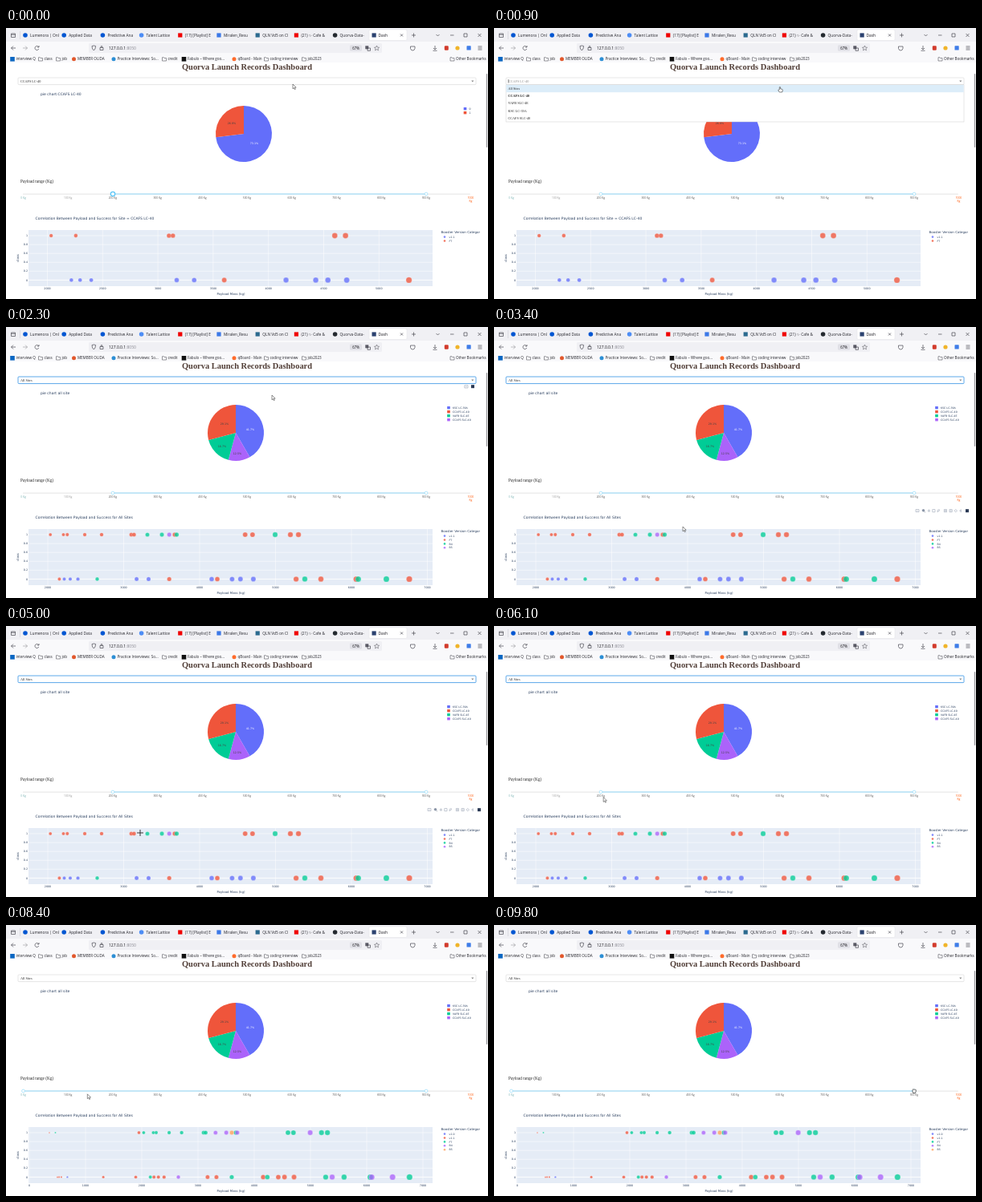
An HTML page for the animation above (9900 ms loop, 600 by 338 pixels).

```html
<!DOCTYPE html>
<html lang="en">
<head>
<meta charset="utf-8">
<title>Dashboard</title>
<style>
html, body { margin: 0; width: 100%; height: 100%; overflow: hidden; background: #fff; }
svg { display: block; width: 100vw; height: 100vh; }
text { white-space: pre; }
.ui { font-family: "Open Sans", "Noto Sans", sans-serif; }
.serif { font-family: "Liberation Serif", serif; }
.plot { font-family: "DejaVu Sans", sans-serif; }
.line { fill: none; stroke: #4a4a52; stroke-width: .7; }
</style>
</head>
<body>
<svg id="stage" viewBox="0 0 600 338" xmlns="http://www.w3.org/2000/svg">
  <defs><clipPath id="legendClip"><rect x="535" y="245" width="55" height="45"/></clipPath></defs>
  <g id="browser"></g>
  <g id="page"></g>
  <g id="pieSite"></g>
  <g id="pieAll"></g>
  <g id="slider"></g>
  <g id="scatterSite"></g>
  <g id="scatterAll"></g>
  <g id="scatterFull"></g>
  <g id="pieBar"></g>
  <g id="scatterBar"></g>
  <g id="dropdown"></g>
  <g id="menu"></g>
  <g id="cursor">
    <path id="arrow" d="M0 0V5.8L1.4 4.6 2.4 6.7 3.3 6.3 2.4 4.2H4.2Z" fill="#fff" stroke="#222" stroke-width=".5"/>
    <path id="hand" d="M-.7 3.4V.3Q0-.5.6.3V2.4L2.8 2.9Q3.5 3.2 3.3 4.2L2.7 6.5H-.7L-2.2 4.2Q-2.2 3.3-1.4 3.6Z" fill="#fff" stroke="#222" stroke-width=".55"/>
    <path id="cross" d="M-4 0H4M0-4V4" stroke="#222" stroke-width=".9"/>
    <path id="grab" d="M-2 1.2V-.5Q-1.5-1.4-.7-.8 0-1.6.7-.8 1.6-1.4 2.2-.2V1.6L1.4 3.6H-1.3Z" fill="#fff" stroke="#222" stroke-width=".7"/>
  </g>
</svg>
<script>
const $ = id => document.getElementById(id);
const INK = '#2a3f5f';
const COLORS = ['#636efa', '#ef553b', '#00cc96', '#ab63fa', '#ffa15a'];

function add(parent, tag, attrs, content) {
  const el = document.createElementNS('http://www.w3.org/2000/svg', tag);
  for (const key in attrs) el.setAttribute(key, attrs[key]);
  if (content !== undefined) el.textContent = content;
  parent.appendChild(el);
  return el;
}
const rect = (g, x, y, width, height, fill, more) => add(g, 'rect', { x, y, width, height, fill, ...more });
const dot = (g, cx, cy, r, fill, more) => add(g, 'circle', { cx, cy, r, fill, ...more });
const line = (g, d, more) => add(g, 'path', { d, class: 'line', ...more });
// y is the vertical middle of the lettering
const label = (g, cls, x, y, size, str, fill, more) =>
  add(g, 'text', { x, y: y + size * .35, class: cls, 'font-size': size, fill, ...more }, str);
const middle = { 'text-anchor': 'middle' };

function drawBrowser(g) {
  rect(g, 0, 0, 600, 17, '#f0f0f4');
  rect(g, 0, 17, 600, 26, '#f9f9fb');
  rect(g, 452, 2, 47, 13.5, '#fff', { rx: 1.5, stroke: '#d8d8de', 'stroke-width': .4 });
  line(g, 'M6.5 7H11.5V11.5H6.5ZM6.5 8.3H11.5');
  line(g, 'M17.5 4V14', { style: 'stroke:#c8c8d0;stroke-width:.5' });
  const tabs = [
    ['Lumenora | Onl', '#0056d2', 1], ['Applied Data', '#0056d2', 1], ['Predictive Ana', '#0056d2', 1],
    ['Talent Lattice', '#4d8df5', 1], ['(17) [Playlist] E', '#f00000', 0], ['Miralen_Resu', '#3b78e7', 0],
    ['QLN Vd5 on Cl', '#2c6a8f', 0], ['(21) ✨ Cafe &', '#f00000', 0], ['Quorva-Data-', '#24292f', 1]
  ];
  tabs.forEach(([name, color, round], i) => {
    const x = 24 + i * 48.2;
    round ? dot(g, x, 9, 2.8, color) : rect(g, x - 2.6, 6.4, 5.2, 5.2, color);
    label(g, 'ui', x + 6, 9, 4.8, name, '#25252c');
  });
  rect(g, 455.5, 6.4, 5.2, 5.2, '#2b426f');
  add(label(g, 'ui', 463.5, 9, 4.8, '', '#15141a'), 'tspan', { id: 'tabName' }, 'Dash');
  line(g, 'M491 7.5L494 10.5M494 7.5L491 10.5M505 9H510M507.5 6.5V11.5M535.5 8L537.5 10 539.5 8M553 9H557.5M570 7H574V11H570ZM587.5 7L591.5 11M591.5 7L587.5 11');

  rect(g, 103, 19, 365, 12, '#f0f0f4', { rx: 1.5 });
  line(g, 'M12 25H6.5M9 22.5L6.5 25 9 27.5');
  line(g, 'M21 25H26.5M24 22.5L26.5 25 24 27.5', { opacity: .5 });
  line(g, 'M40.6 23.7A2.5 2.5 0 1 0 40.8 26M41 22V24H39');
  line(g, 'M107 22.6L109.3 22 111.6 22.6Q111.6 26.5 109.3 28 107 26.5 107 22.6ZM117 24.5H121V27.5H117ZM118 24.5Q118 22.3 119 22.3 120 22.3 120 24.5');
  const url = label(g, 'ui', 128, 25, 5, '127.0.0.1', '#15141a');
  add(url, 'tspan', { fill: '#8a8a93' }, ':8050');
  rect(g, 428, 21.3, 15, 7.4, '#e0e0e6', { rx: 1.5 });
  label(g, 'ui', 435.5, 25, 4.4, '67%', '#15141a', middle);
  rect(g, 447.3, 22.3, 4, 4, '#5b5b66');
  line(g, 'M450 25H453.5V28.3H450Z');
  line(g, 'M461.5 22L462.4 24.1 464.6 24.3 462.9 25.7 463.5 27.9 461.5 26.7 459.5 27.9 460.1 25.7 458.4 24.3 460.6 24.1Z', { style: 'stroke-width:.5' });
  line(g, 'M503.5 23H509V25.5Q508.5 28 506.3 28 504 28 503.5 25.5ZM534 22V26.5M532 25L534 27 536 25M531.5 28.3H536.5');
  rect(g, 545.8, 22.3, 5, 5.4, '#d23b2c', { rx: 1.2 });
  dot(g, 562, 25, 2.6, '#f0b429');
  rect(g, 573.5, 22.3, 5.2, 5.2, '#3f7de8', { rx: .6 });
  line(g, 'M587.5 23H592.5M587.5 25H592.5M587.5 27H592.5');

  const marks = [
    [8, 'interview Q', '#0a66c2'], [43, 'class'], [65, 'job'], [84.5, 'MEMBER OLIDA', '#e2582c'],
    [134, 'Practice Interviews: So...', '#2d8fd5'], [197, 'credit'], [221.5, 'Fabulo – Where goo…', '#111'],
    [284, 'qBoard - Main', '#ff6c2c'], [324, 'coding interview'], [371, 'job2023'], [555.5, 'Other Bookmarks']
  ];
  for (const [x, name, color] of marks) {
    if (!color) line(g, `M${x - 2.5} 36.7H${x - .5}L${x} 37.5H${x + 2.5}V41H${x - 2.5}Z`, { style: 'stroke-width:.55' });
    else if (x < 20 || x > 220 && x < 230) rect(g, x - 2.8, 36, 5.6, 5.6, color);
    else dot(g, x, 38.8, 2.5, color);
    label(g, 'ui', x + 4.4, 38.8, 4.6, name, '#25252c');
  }
}

function drawPage(g) {
  rect(g, 0, 43, 600, 295, '#fff');
  label(g, 'serif', 300, 48.8, 10.45, 'Quorva Launch Records Dashboard', '#503d36', { 'font-weight': 'bold', ...middle });
  rect(g, 597.8, 57, 1.4, 92, '#9a9a9e', { rx: .7 });
  label(g, 'serif', 18, 191.5, 5.25, 'Payload range (Kg)', '#222');
}

function drawDropdown() {
  const g = $('dropdown');
  rect(g, 15, 62, 570, 8.6, '#fff', { id: 'box', rx: 1 });
  label(g, 'serif', 18, 66.3, 4.2, 'CCAFS LC-40', '#222', { id: 'choice' });
  add(g, 'path', { d: 'M579.2 65.6H582.4L580.8 67.4Z', fill: '#888' });
  const m = $('menu');
  rect(m, 15, 70.8, 570, 46.2, '#fff', { stroke: '#ccc', 'stroke-width': .5 });
  rect(m, 15.3, 71, 569.4, 9.2, '#dcedf9');
  line(m, 'M18 64V68.6', { style: 'stroke:#111;stroke-width:.5' });
  ['All Sites', 'CCAFS LC-40', 'VAFB SLC-4E', 'KSC LC-39A', 'CCAFS SLC-40'].forEach((name, i) =>
    label(m, 'serif', 17.5, 75.6 + i * 9.15, 4.2, name, '#222', { 'font-weight': i === 1 ? 'bold' : 'normal' }));
}

// slices run clockwise from the top: [share, color index, label x, label y]
function drawPie(g, title, cx, slices, legendX, names) {
  label(g, 'plot', 43, 82.5, 4.5, title, INK);
  const r = 35, cy = 132;
  const at = share => `${cx + r * Math.sin(share * 2 * Math.PI)} ${cy - r * Math.cos(share * 2 * Math.PI)}`;
  let from = 0;
  for (const [share, color] of slices) {
    add(g, 'path', { d: `M${cx} ${cy}L${at(from)}A${r} ${r} 0 ${share > .5 ? 1 : 0} 1 ${at(from + share)}Z`, fill: COLORS[color] });
    from += share;
  }
  for (const [share, color, x, y] of slices)
    label(g, 'plot', x, y, 3.3, (share * 100).toFixed(1) + '%', color ? '#444' : '#fff', middle);
  names.forEach((name, i) => {
    rect(g, legendX - 1.8, 99 + i * 5, 3.6, 3.4, COLORS[i]);
    label(g, 'plot', legendX + 5, 100.8 + i * 5, 3.2, name, INK);
  });
}

// payloads per booster: [name, landed, failed]
const BOOSTERS = [
  ['v1.0', [], [677]],
  ['v1.1', [357, 1950], [500, 530, 570, 1316, 1893, 2217, 2296, 2397, 3170, 3328, 4159, 4428, 4538, 4708]],
  ['FT', [464, 2034, 2206, 2257, 2487, 2709, 3100, 3136, 3672, 4600, 4697, 5196, 5302],
    [2153, 3600, 4233, 5271, 5598, 6063, 6762]],
  ['B4', [3312, 3503, 3698, 4995], [2651, 5386, 6090, 6460]],
  ['B5', [3600], []]
];
const SITE_FT = [2034, 2257, 3100, 3136, 4600, 4697, 3600, 5271];

function drawScatter(g, { title, boosters, keep, max, x0, first, step, scale, count }) {
  const px = kg => x0 + (kg - first) * scale;
  label(g, 'plot', 36.5, 237.5, 4.5, title, INK);
  rect(g, 28, 252, 503, 70, '#e5ecf6');
  for (let i = 0; i < count; i++) {
    const kg = first + i * step, x = px(kg);
    line(g, `M${x} 252V322`, { style: 'stroke:#fff;stroke-width:.5' });
    label(g, 'plot', x, 324.6, 3.3, kg, INK, middle);
  }
  for (let i = 0; i <= 5; i++) {
    const y = 314.4 - i * 11.08;
    line(g, `M28 ${y}H531`, { style: `stroke:#fff;stroke-width:${i ? .5 : .9}` });
    label(g, 'plot', 27, y, 3.3, i / 5, INK, { 'text-anchor': 'end' });
  }
  label(g, 'plot', 280, 331.5, 3.9, 'Payload Mass (kg)', INK, middle);
  label(g, 'plot', 0, 0, 3.9, 'class', INK, { transform: 'translate(14.5 287)rotate(-90)', ...middle });
  label(g, 'plot', 541.5, 255, 4, 'Booster Version Category', INK, { 'clip-path': 'url(#legendClip)' });
  boosters.forEach(([name, ...rows], i) => {
    rows.forEach((row, failed) => row.filter(kg => keep(kg, name)).forEach(kg =>
      dot(g, px(kg), failed ? 314.4 : 259, 3.7 * Math.sqrt(kg / max), COLORS[i],
        { 'fill-opacity': .78, stroke: '#fff', 'stroke-width': .25 })));
    dot(g, 546, 260.6 + i * 4.9, 1.3, COLORS[i], { 'fill-opacity': .8 });
    label(g, 'plot', 551.5, 260.6 + i * 4.9, 3.2, name, INK);
  });
}

function drawSlider(g) {
  rect(g, 21, 206.4, 557, 1.3, '#e9e9e9', { rx: .6 });
  rect(g, 133, 206.4, 390, 1.3, '#abe2fb', { id: 'track' });
  for (let i = 0; i < 10; i++) {
    const x = 21.5 + i * 55.7;
    label(g, 'ui', x, 211.5, 3.3, i * 100 + ' Kg', i ? '#555' : '#77b0b1', { id: 'mark' + i, ...middle });
  }
  ['1000', 'Kg'].forEach((s, i) => label(g, 'ui', 578.5, 211.5 + i * 4, 3.3, s, '#f50', middle));
  const edge = { stroke: '#96dbfa', 'stroke-width': .7 };
  dot(g, 523, 207, 1.9, '#fff', edge);
  dot(g, 133, 207, 1.9, '#fff', { id: 'handle', ...edge });
}

function drawBars() {
  const p = $('pieBar'), s = $('scatterBar');
  const faint = { style: 'stroke:#9aa5b5;stroke-width:.6' };
  line(p, 'M570.8 72.8H575V76H570.8ZM572.2 74.4H573.6', faint);
  rect(p, 579, 72.2, 4, 4, '#2b3a55');
  line(s, 'M525 227.6H529V230.6H525ZM526.4 229.1H527.6', faint);
  dot(s, 534.5, 228.8, 1.3, '#8c98aa', { stroke: '#69758a', 'stroke-width': .6 });
  line(s, 'M535.5 230L536.8 231.2', { style: 'stroke:#69758a' });
  line(s, 'M539.5 229.2H543.3M541.4 227.3V231.1M545.8 227.6H549V230.8H545.8ZM552 230.8Q551.5 227.5 554 227.6 556.5 228.2 553 230Z', faint);
  line(s, 'M560.3 227.6H563.5V230.8H560.3ZM561 229.2H562.8M561.9 228.3V230.1M567 227.6H570.2V230.8H567ZM567.7 229.2H569.5M573 229.2L574.8 227.6 576.6 229.2 574.8 230.8ZM579.6 229.2L581.4 227.8V230.8Z', faint);
  rect(s, 587, 227.2, 4, 4, '#2b3a55');
}

drawBrowser($('browser'));
drawPage($('page'));
drawDropdown();
drawPie($('pieSite'), 'pie chart:CCAFS LC-40', 296, [[.731, 0, 309, 144], [.269, 1, 281, 119]], 571.5, ['0', '1']);
drawPie($('pieAll'), 'pie chart all site', 286,
  [[.417, 0, 304, 128], [.125, 3, 288, 157.5], [.167, 2, 269, 149], [.291, 1, 272, 121]],
  551, ['KSC LC-39A', 'CCAFS LC-40', 'VAFB SLC-4E', 'CCAFS SLC-40']);
drawSlider($('slider'));
const heading = 'Correlation Between Payload and Success for ';
drawScatter($('scatterSite'), {
  title: heading + 'Site = CCAFS LC-40', boosters: BOOSTERS.slice(1, 3), max: 5271,
  keep: (kg, name) => name === 'FT' ? SITE_FT.includes(kg) : kg > 2000,
  x0: 51.5, first: 2000, step: 500, scale: .1376, count: 7
});
drawScatter($('scatterAll'), {
  title: heading + 'All Sites', boosters: BOOSTERS.slice(1), max: 6762, keep: kg => kg > 2000,
  x0: 52, first: 2000, step: 1000, scale: .0945, count: 6
});
drawScatter($('scatterFull'), {
  title: heading + 'All Sites', boosters: BOOSTERS, max: 6762, keep: () => true,
  x0: 29, first: 0, step: 1000, scale: .07, count: 8
});
drawBars();

// pointer stops: [time, x, y]
const PATH = [
  [0, 357, 70], [100, 357, 70], [200, 356, 71], [500, 356, 71], [900, 356, 73.5], [1400, 356, 74],
  [2300, 331, 85], [2500, 331, 85], [3400, 235, 249], [3800, 296, 263], [4400, 314, 258], [4800, 211, 258],
  [4900, 211, 258], [5000, 167, 258], [5200, 158, 259], [5400, 158, 259], [6300, 133, 207], [6500, 133, 207],
  [7000, 21, 207], [7200, 28.5, 208], [7500, 131, 213], [7700, 76, 211], [8300, 76, 211], [9000, 533, 208],
  [9200, 523, 206], [9900, 523, 206]
];
const HANDS = [[0, 'arrow'], [600, 'hand'], [1300, 'arrow'], [3500, 'cross'], [5700, 'arrow'], [6200, 'hand'],
  [6600, 'grab'], [7100, 'arrow'], [9200, 'hand'], [9700, 'grab']];

const clamp = v => Math.max(0, Math.min(1, v));
const ease = v => v * v * (3 - 2 * v);
const show = (id, on) => $(id).style.display = on ? '' : 'none';

function pointer(t) {
  const i = PATH.findIndex(p => p[0] > t);
  const [t0, x0, y0] = PATH[i - 1], [t1, x1, y1] = PATH[i];
  const k = ease((t - t0) / (t1 - t0));
  return [x0 + (x1 - x0) * k, y0 + (y1 - y0) * k];
}

function render(t) {
  const within = (a, b) => t >= a && t < b;
  const all = t >= 1400;
  show('menu', within(600, 1300));
  show('pieSite', !all);
  show('pieAll', all);
  show('scatterSite', t < 1600);
  show('scatterAll', within(1600, 8000));
  show('scatterFull', t >= 8000);
  show('pieBar', within(1500, 2900));
  show('scatterBar', within(3300, 5900));
  $('tabName').textContent = within(1300, 1600) || within(7900, 8100) ? 'Updating' : 'Dash';

  const focus = within(1300, 6600);
  $('box').setAttribute('stroke', focus ? '#4a9fe8' : '#ccc');
  $('box').setAttribute('stroke-width', focus ? .9 : .5);
  $('choice').textContent = t < 1300 ? 'CCAFS LC-40' : 'All Sites';
  $('choice').setAttribute('fill', within(600, 1300) ? '#888' : '#222');

  const [x, y] = pointer(t);
  const low = t < 6500 ? 133 : t < 7000 ? x : 21.5;
  const glow = t < 300 ? clamp(1 - t / 200) : clamp((t - 6100) / 200) * clamp((7500 - t) / 200);
  const handle = $('handle');
  handle.setAttribute('cx', low);
  handle.setAttribute('r', 1.9 + .8 * glow);
  handle.setAttribute('stroke', glow > .4 ? '#57c5f7' : '#96dbfa');
  handle.setAttribute('stroke-width', .7 + .5 * glow);
  $('track').setAttribute('x', low);
  $('track').setAttribute('width', 523 - low);
  for (let i = 1; i < 10; i++) $('mark' + i).setAttribute('fill', 21.5 + i * 55.7 < low - 1 ? '#999' : '#555');

  const kind = HANDS.filter(h => h[0] <= t).pop()[1];
  for (const id of ['arrow', 'hand', 'cross', 'grab']) show(id, id === kind);
  $('cursor').setAttribute('transform', `translate(${x} ${y})`);
}

const start = performance.now();
function tick() {
  const t = (performance.now() - start) % 9900;
  render(Math.floor(t / 100) * 100);
  requestAnimationFrame(tick);
}
tick();
</script>
</body>
</html>
```
